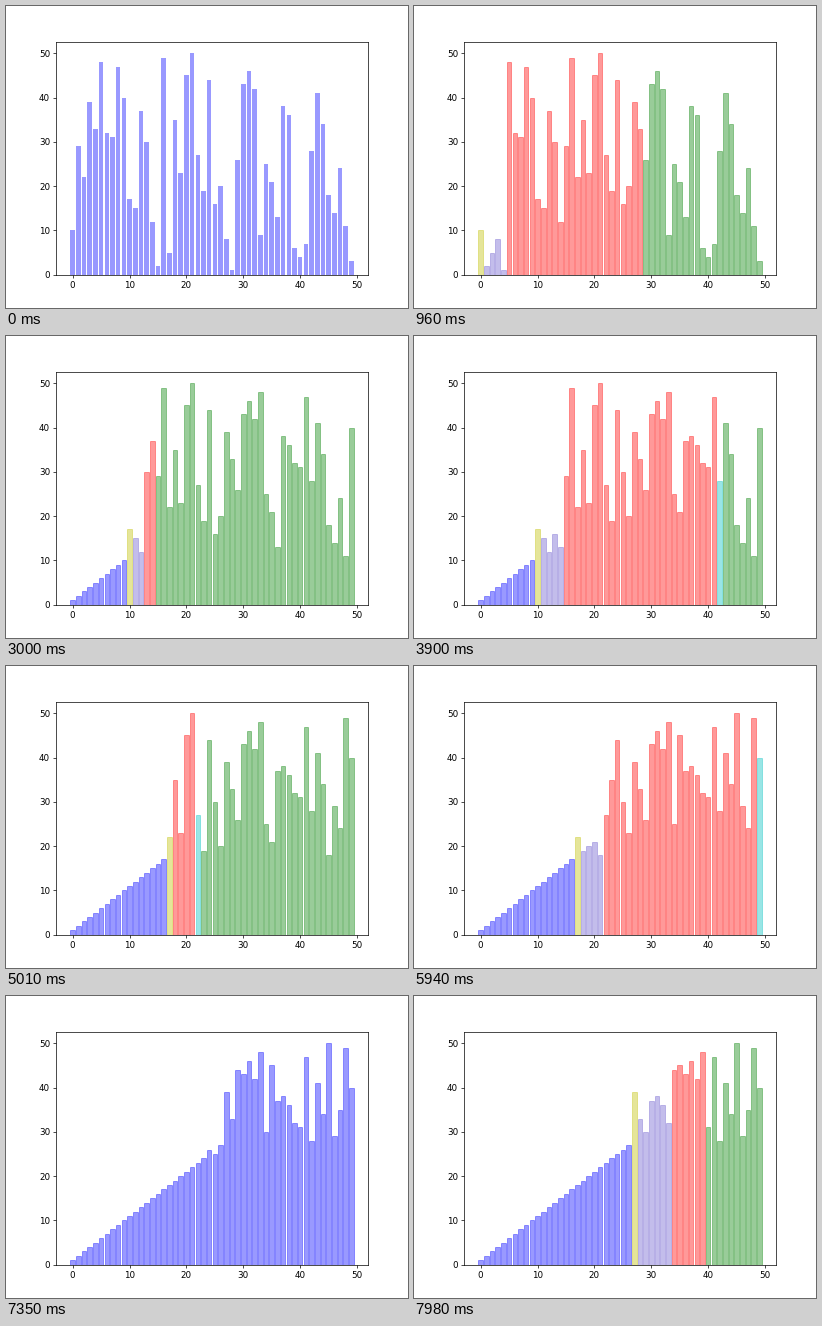
These frames come from a looping animation (402x302 px, 8 s). A matplotlib script:

```python
from itertools import islice

import matplotlib.pyplot as plt
from matplotlib.animation import FuncAnimation

WIDTH, HEIGHT, DPI = 402, 302, 62.8125
LOOP_MS, FRAMES = 8000, 267

START = [10, 29, 22, 39, 33, 48, 32, 31, 47, 40,
         17, 15, 37, 30, 12, 2, 49, 5, 35, 23,
         45, 50, 27, 19, 44, 16, 20, 8, 1, 26,
         43, 46, 42, 9, 25, 21, 13, 38, 36, 6,
         4, 7, 28, 41, 34, 18, 14, 24, 11, 3]

IDLE, PIVOT, LESS, MORE, CURRENT, TODO = "b", "y", "slateblue", "r", "c", "g"


def paint(n, lo, hi, split, j, comparing):
    """Colours while the range lo..hi is being partitioned."""
    colors = [IDLE] * n
    colors[lo] = PIVOT
    for k in range(lo + 1, hi + 1):
        if k <= split:
            colors[k] = LESS
        elif k > j:
            colors[k] = TODO
        elif k == j and comparing:
            colors[k] = CURRENT
        else:
            colors[k] = MORE
    return colors


def quicksort(a, lo, hi):
    """Yield (values, colours) after every comparison and swap."""
    if lo >= hi:
        return
    n, split = len(a), lo
    for j in range(lo + 1, hi + 1):
        yield a[:], paint(n, lo, hi, split, j, True)
        if a[j] < a[lo]:
            split += 1
            a[split], a[j] = a[j], a[split]
            yield a[:], paint(n, lo, hi, split, j, False)
    a[lo], a[split] = a[split], a[lo]
    yield a[:], [IDLE] * n
    yield from quicksort(a, lo, split - 1)
    yield from quicksort(a, split + 1, hi)


steps = list(islice(quicksort(START[:], 0, len(START) - 1), FRAMES - 1))

# A hair of extra height keeps the pixel size from rounding down.
fig, ax = plt.subplots(figsize=(WIDTH / DPI, (HEIGHT + 0.001) / DPI), dpi=DPI)
bars = ax.bar(range(len(START)), START, color=IDLE, alpha=0.4)


def reset():
    for bar, value in zip(bars, START):
        bar.set_height(value)
        bar.set_facecolor(IDLE)
        bar.set_edgecolor("none")
    return list(bars)


def draw(frame):
    if frame == 0:
        return reset()
    for bar, value, color in zip(bars, *steps[frame - 1]):
        bar.set_height(value)
        bar.set_color(color)
    return list(bars)


anim = FuncAnimation(fig, draw, frames=FRAMES, init_func=reset,
                     interval=LOOP_MS / FRAMES, repeat=True, repeat_delay=0)
plt.show()
```
